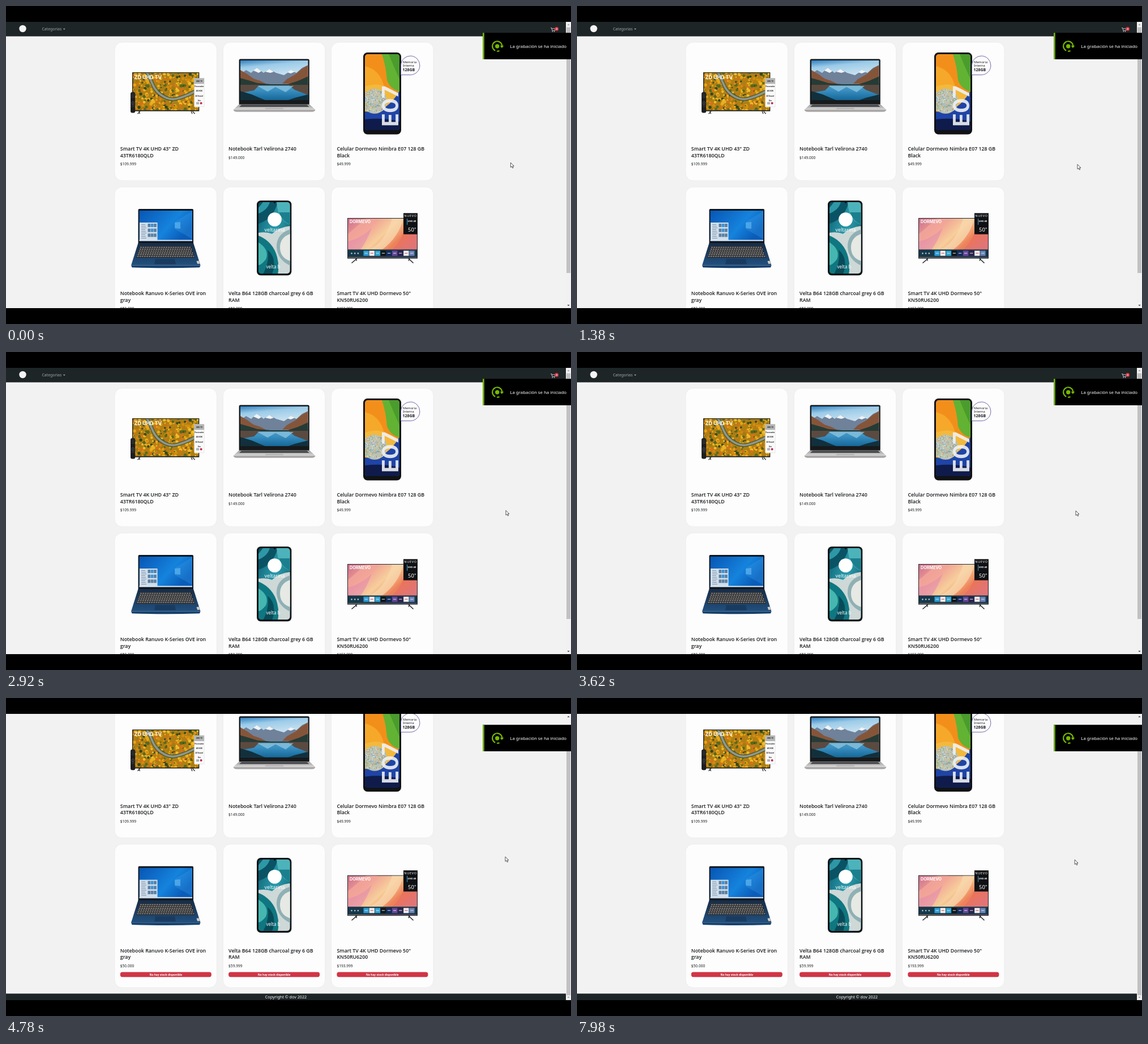
Recreate the animation shown at these times as an HTML page. Size 998 px wide and 561 px high, loop 8000 ms.

```html
<!DOCTYPE html>
<html lang="es">
<head>
<meta charset="utf-8">
<title>Tienda</title>
<style>
  html, body { margin: 0; width: 100%; height: 100%; overflow: hidden; background: #000; }
  svg { display: block; width: 998px; height: 561px; }
  text { font-family: "Noto Sans", "Open Sans", sans-serif; }
  .title { font-family: "Open Sans", "Noto Sans", sans-serif; font-size: 8.8px; font-weight: 600; fill: #17191c; }
  .price { font-size: 6.6px; fill: #1d2023; }
  .stock { font-size: 4.85px; font-weight: 700; fill: #fff; text-anchor: middle; }
  .geo { font-family: "Inter", sans-serif; }
</style>
</head>
<body>
<svg viewBox="0 0 998 561">
  <defs>
    <clipPath id="view"><rect y="28" width="998" height="505"/></clipPath>
    <clipPath id="tvA"><rect x="224.5" y="118.3" width="115.5" height="65.5"/></clipPath>
    <clipPath id="lapA"><rect x="414" y="96" width="119.5" height="70"/></clipPath>
    <clipPath id="telA"><rect x="634" y="85" width="61" height="134" rx="5"/></clipPath>
    <clipPath id="telB"><rect x="446" y="346" width="55.5" height="126" rx="5"/></clipPath>
    <linearGradient id="sky" x2=".3" y2="1">
      <stop offset="0" stop-color="#2f7fc0"/><stop offset=".3" stop-color="#9ccbe8"/><stop offset="1" stop-color="#e2eff5"/>
    </linearGradient>
    <linearGradient id="lake" x2="0" y2="1">
      <stop offset="0" stop-color="#6f8794"/><stop offset=".4" stop-color="#3c93c4"/><stop offset="1" stop-color="#136596"/>
    </linearGradient>
    <linearGradient id="silver" x2="0" y2="1">
      <stop offset="0" stop-color="#9c9c9e"/><stop offset="1" stop-color="#dad8d7"/>
    </linearGradient>
    <linearGradient id="desk" x2="1" y2=".5">
      <stop offset="0" stop-color="#0856b4"/><stop offset=".65" stop-color="#1583dd"/><stop offset="1" stop-color="#0a5cb8"/>
    </linearGradient>
    <linearGradient id="navy" x2="0" y2="1">
      <stop offset="0" stop-color="#182c45"/><stop offset="1" stop-color="#21507f"/>
    </linearGradient>
    <linearGradient id="teal" x2="1" y2=".8">
      <stop offset="0" stop-color="#0c5f72"/><stop offset=".5" stop-color="#2b9bab"/><stop offset="1" stop-color="#0b5564"/>
    </linearGradient>
    <linearGradient id="sunset" x2="1" y2=".6">
      <stop offset="0" stop-color="#cd6f8c"/><stop offset=".3" stop-color="#f0a294"/><stop offset=".55" stop-color="#f7cf9c"/>
      <stop offset=".78" stop-color="#ee8158"/><stop offset="1" stop-color="#cf83a8"/>
    </linearGradient>
  </defs>

  <g clip-path="url(#view)">
    <rect y="28" width="998" height="505" fill="#f2f2f2"/>
    <g id="page">
      <rect y="28" width="989" height="25.5" fill="#1e2527"/>
      <circle cx="29.5" cy="40" r="6.2" fill="#f4f4f4"/>
      <text x="63.5" y="43.3" font-size="6.9" fill="#a3a6a8">Categorias</text>
      <path d="M100.8 39.8h4l-2 2.1z" fill="#a3a6a8"/>
      <path d="M962 38.6h1.6l1.3 4.8h4.4l1-3.5h-6.2" fill="none" stroke="#e8e8e8" stroke-width=".8"/>
      <circle cx="965.3" cy="45" r=".8" fill="#e8e8e8"/><circle cx="968.6" cy="45" r=".8" fill="#e8e8e8"/>
      <circle cx="972.6" cy="40.4" r="3.4" fill="#dc3545"/>
      <text x="972.6" y="42" font-size="4.2" font-weight="700" fill="#fff" text-anchor="middle">0</text>

      <g id="cards"></g>

      <!-- television with autumn forest -->
      <g>
        <rect x="223" y="117" width="118.3" height="68.6" fill="#1b1d19"/>
        <g clip-path="url(#tvA)">
          <rect x="223" y="117" width="119" height="69" fill="#b07f14"/>
          <g id="leaves"></g>
          <path d="M248 116C258 130 258 146 274 157S300 165 316 159S330 150 344 150" fill="none" stroke="#4c5a2c" stroke-width="6.5"/>
          <path d="M248 116C258 130 258 146 274 157S300 165 316 159S330 150 344 150" fill="none" stroke="#8f968c" stroke-width="3.8"/>
        </g>
        <text class="geo" x="226.5" y="128.6" font-size="8.9" font-weight="700" fill="#fff">ZD UHD TV</text>
        <path d="M237 185.6l-4.5 4.6M234.5 185.6l2 4.6M327 185.6l2 4.6M329.5 185.6l4 4.6" stroke="#26282a" stroke-width="1.3"/>
        <rect x="220" y="152" width="8.2" height="36.5" rx="3" fill="#1d1e20"/>
        <g id="buttons"></g>
        <circle cx="224.1" cy="171" r="2.2" fill="none" stroke="#6a6c70" stroke-width=".7"/>
        <rect x="332.6" y="127.4" width="17.4" height="50.5" fill="#fafafa" stroke="#d4d4d4" stroke-width=".5"/>
        <rect x="332.6" y="127.4" width="17.4" height="10" fill="#b4b5b5"/>
        <g font-size="3" font-weight="700" fill="#222" text-anchor="middle">
          <text x="341.3" y="133.8">UHD TV</text><text x="341.3" y="143">Procesador</text>
          <text x="341.3" y="151.4">4K HDR</text><text x="341.3" y="159.6">AI Sound</text><text x="341.3" y="167.5">Voz</text>
        </g>
        <circle cx="344.6" cy="171.4" r="2" fill="#c32a51"/><rect x="336" y="169.5" width="5" height="4" fill="#aab2bd"/>
      </g>

      <!-- silver notebook -->
      <g>
        <rect x="411.6" y="93.6" width="124.2" height="81" rx="2.5" fill="#17191b"/>
        <g clip-path="url(#lapA)">
          <rect x="414" y="96" width="120" height="40" fill="url(#sky)"/>
          <rect x="414" y="134" width="120" height="33" fill="url(#lake)"/>
          <path d="M414 120l10-7 9 5 10-9 12 9 10-7 12 7 14 4 12-8 10 4 10-9 11-5v33H414z" fill="#70819a"/>
          <path d="M437 114l6-5 8 6-5 3-4-2zM458 116l7-5 8 5-6 2zM497 117l6-4 7 3-7 3z" fill="#eef3f6"/>
          <path d="M414 113l12 7 11 8 12 4 10 5h-45zM534 104l-13 8-9 8-16 9-8 8h46z" fill="#85553a"/>
          <path d="M414 127l14 4 16 5 24 2h30l18-6 18-8v16H414z" fill="#263b36"/>
          <path d="M414 139h34l-10 10-24 4zM534 139h-36l12 9 24 9z" fill="#5b4a40"/>
          <path d="M444 141l18 10 14-8 18 9 14-11z" fill="#8cc6e2" opacity=".75"/>
          <path d="M414 150l20 6 14 6 12 5h-46zM534 156l-24 6-14 5h38z" fill="#12303c"/>
        </g>
        <path d="M411.6 173.500h124.400l10.500 9.500H401.500z" fill="url(#silver)"/>
        <path d="M416 174.300h115.500l4 3.600H412z" fill="#47494c"/>
        <path d="M459 179.500h30l1.400 2.600h-33z" fill="#b5b4b4"/>
        <path d="M401.500 183h145q-1 3.700-6 3.700H407.500q-5 0-6-3.700z" fill="#a9a7a6"/>
      </g>

      <!-- phone with side lettering -->
      <g>
        <rect x="631" y="82" width="67" height="144.500" rx="7.500" fill="#111214"/>
        <g clip-path="url(#telA)">
          <rect x="634" y="85" width="61" height="134" fill="#1e43a0"/>
          <path d="M634 85h61v70l-61 20z" fill="#f28f1b"/>
          <path d="M634 106q26 6 34 36l-34 24z" fill="#f6a82b"/>
          <path d="M664 85h31v66q-16-4-22-20-2-26-9-46z" fill="#62b234"/>
          <path d="M676 85h19v44q-10-22-19-44z" fill="#4a9c2c"/>
          <path d="M634 142q30-12 61 16v22l-61 14z" fill="#f2b93e"/>
          <path d="M634 186q36 6 61-36v70h-61z" fill="#1f44a6"/>
          <path d="M634 200q34-4 61 4v16h-61z" fill="#0f1b4a"/>
          <circle cx="651" cy="168" r="22" fill="#b9c1b6"/>
          <g id="dots"></g>
        </g>
        <text class="geo" transform="translate(692.500 213) rotate(-90)" font-size="39.500" font-weight="700" fill="#eef1f5" opacity=".9">E07</text>
        <path d="M697.500 121.500V104.500a16.700 16.700 0 1 1 16.700 17z" fill="#fdfdfd" stroke="#5b58a0" stroke-width=".9"/>
        <g class="geo" fill="#1d1d25">
          <text x="701" y="101" font-size="5.700">Memoria</text>
          <text x="701" y="107" font-size="5.700">Interna</text>
          <text x="700.500" y="115.300" font-size="7" font-weight="700">128GB</text>
        </g>
      </g>

      <!-- blue notebook -->
      <g>
        <rect x="233.500" y="358" width="97.500" height="62" rx="2" fill="#12161c"/>
        <rect x="235.500" y="361" width="93.500" height="53.500" fill="url(#desk)"/>
        <path d="M329 362l-30 18v14l30 17z" fill="#42a9ee" opacity=".25"/>
        <path d="M298 382l10-1v12l-10-1z" fill="#7cc8f5" opacity=".5"/>
        <rect x="236" y="382" width="31.500" height="31" fill="#cfdeec"/>
        <g id="tiles"></g>
        <rect x="235.500" y="412.600" width="93.500" height="2" fill="#dfe6ee"/>
        <path d="M233.500 418h97.500l12.500 39.500H221z" fill="url(#navy)"/>
        <path d="M237 424h90l7 20H230z" fill="#22262c"/>
        <g id="keys" stroke="#85807a" stroke-width="2" fill="none" stroke-dasharray="3 1.100"></g>
        <path d="M264 446h34l2 9.500h-38z" fill="#1a3b60"/>
        <path d="M221 457.500h122.500l-1.500 3.800q-60 2-119.500 0z" fill="#16406c"/>
        <path d="M336.500 450l4-.5 1.700 5-4 .6z" fill="#d9cfc4"/>
      </g>

      <!-- teal phone -->
      <g>
        <rect x="443" y="343.300" width="61.300" height="132" rx="7" fill="#0f1214"/>
        <g clip-path="url(#telB)">
          <rect x="446" y="346" width="56" height="127" fill="url(#teal)"/>
          <path d="M480 346q-8 30-34 38v-38z" fill="#0a5365"/>
          <path d="M466 346q-4 14-20 20v-10l8-10z" fill="#2e97a6"/>
          <path d="M502 346v40q-22-8-24-40z" fill="#4db3bb"/>
          <path d="M502 364v22q-14-6-20-22z" fill="#1c7f8e"/>
          <path d="M446 400q14-2 24 2 12-12 32-14v85h-22q2-44-34-62z" fill="#cdd8d7"/>
          <path d="M502 394q-25 8-24 32 2 22 24 32z" fill="#8fb0b4"/>
          <path d="M502 402q-18 6-18 24t18 24z" fill="#e6e9e4"/>
          <path d="M446 405q26 11 33 38 4 16 1 30h-34z" fill="#0f7781"/>
          <path d="M446 417q20 13 13 30-8 10-13 10z" fill="#46b7b0"/>
          <path d="M462 430q18 15 8 43H454q12-22 8-43z" fill="#084b58"/>
        </g>
        <circle cx="474.500" cy="346.700" r="1.300" fill="#050607"/>
        <circle cx="474.500" cy="376.500" r="12.300" fill="#fff"/>
        <g class="geo" fill="#fff" text-anchor="middle">
          <text x="474.500" y="398.300" font-size="8.800">veltarina</text>
          <text x="472" y="463.300" font-size="8">velta b</text>
        </g>
      </g>

      <!-- television with app row -->
      <g>
        <rect x="603" y="374" width="124" height="71.500" fill="#23262d"/>
        <rect x="604" y="375" width="122" height="69" fill="url(#sunset)"/>
        <path d="M604 402l32-27h20q-22 32-52 47z" fill="#f4a59a" opacity=".8"/>
        <path d="M640 430q28-10 42-55h20q-9 34-38 55z" fill="#f9d9ae" opacity=".75"/>
        <path d="M681 430q20-16 25-46l20 18v28z" fill="#ea6d5c" opacity=".65"/>
        <path d="M604 430v-15q24-5 42-24-9 25-20 39z" fill="#e48cae" opacity=".6"/>
        <rect x="604" y="429.500" width="122" height="14" fill="#16384a"/>
        <g id="apps"></g>
        <text class="geo" x="607" y="383.400" font-size="7.200" font-weight="700" fill="#fff">DORMEVO</text>
        <rect x="702" y="365.400" width="25" height="37.300" fill="#101114"/>
        <path d="M708.700 375v11" stroke="#3aa5dd" stroke-width="1"/>
        <g class="geo" fill="#fff" text-anchor="middle">
          <text x="714.500" y="372.300" font-size="5.600" letter-spacing=".7">NUEVO</text>
          <text x="717" y="381.300" font-size="4" font-weight="700">UHD 4K</text>
          <text x="717.300" y="398.300" font-size="9.400">50"</text>
        </g>
        <path d="M620 445.500l-9.500 8M617.500 445.500l2 4M711 445.500l8.500 8M713 445.500l-2 4" stroke="#24262a" stroke-width="1.500"/>
      </g>

      <rect y="582.800" width="989" height="12" fill="#1e2527"/>
      <text x="494.500" y="591.200" font-size="7.200" fill="#fff" text-anchor="middle">Copyright © dov 2022</text>
    </g>

    <rect x="989" y="28" width="9" height="505" fill="#f1f1f1"/>
    <path d="M991.300 34h4.400l-2.200-2.500z" id="up"/>
    <path d="M991.300 527h4.400l-2.200 2.500z" id="down"/>
    <rect id="thumb" x="990" y="37.500" width="7" height="433.500" fill="#c1c1c1"/>

    <rect x="842" y="47.300" width="156" height="46.700" fill="#000"/>
    <rect x="842" y="47.300" width="2.800" height="46.700" fill="#70ad12"/>
    <g stroke="#76b900" fill="none" stroke-width="2.200">
      <path d="M864.200 78.700A8.600 8.600 0 1 1 876.300 70.500"/>
      <path d="M867 79.700A8.600 8.600 0 0 0 871.500 79" stroke-width="2"/>
    </g>
    <path d="M872.600 70h6.600l-3.300 4.300z" fill="#76b900"/>
    <circle cx="867.700" cy="71" r="3.700" fill="#76b900"/>
    <text x="890.300" y="73.900" font-size="7.850" fill="#fff">La grabación se ha iniciado</text>
  </g>

  <path id="cursor" d="M0 0v8.300l1.900-1.700 1.400 3 1.500-.7-1.400-2.900h2.500z" fill="#fff" stroke="#222" stroke-width=".75"/>
</svg>
<script>
const $ = id => document.getElementById(id);
const times = (n, fn) => Array.from({ length: n }, (_, i) => fn(i)).join('');
let seed = 11;
const rnd = () => (seed = (seed * 16807) % 2147483647) / 2147483647;
const pick = list => list[Math.floor(rnd() * list.length)];
const box = (x, y, w, h, fill) => `<rect x="${x}" y="${y}" width="${w}" height="${h}" fill="${fill}"/>`;
const dot = (x, y, r, fill) => `<circle cx="${x}" cy="${y}" r="${r}" fill="${fill}"/>`;

const products = [
  ['$109.999', 'Smart TV 4K UHD 43" ZD', '43TR6180QLD'],
  ['$149.000', 'Notebook Tarl Velirona 2740'],
  ['$49.999', 'Celular Dormevo Nimbra E07 128 GB', 'Black'],
  ['$50.000', 'Notebook Ranuvo K-Series OVE iron', 'gray'],
  ['$59.999', 'Velta B64 128GB charcoal grey 6 GB', 'RAM'],
  ['$193.999', 'Smart TV 4K UHD Dormevo 50"', 'KN50RU6200']
];

function card([price, ...lines], i) {
  const x = 192 + (i % 3) * 191.3, low = i > 2;
  const top = low ? 319.3 : 64, base = low ? 510.2 : 255.1;
  const label = (cls, y, s) => `<text class="${cls}" x="${x + 9.8}" y="${y}">${s}</text>`;
  let out = `<rect x="${x}" y="${top}" width="180.4" height="${low ? 253 : 244}" rx="13" fill="#fdfdfd" stroke="#e6e6e6" stroke-width=".6"/>`;
  lines.forEach((s, n) => out += label('title', base + n * 11.5, s));
  out += label('price', base + 3.1 + lines.length * 11.4, price);
  if (low) out += `<rect x="${x + 9.8}" y="544.7" width="161" height="8.8" rx="3.6" fill="#d03546"/>
    <text class="stock" x="${x + 90.3}" y="550.9">No hay stock disponible</text>`;
  return out;
}

$('cards').innerHTML = products.map(card).join('');
const foliage = ['#e6a614', '#d58a10', '#f0bd2a', '#56691f', '#33481a', '#d9701a', '#a37a14', '#eab020'];
$('leaves').innerHTML = times(420, () => dot(223 + rnd() * 119, 117 + rnd() * 69, 1 + rnd() * 2, pick(foliage)));
$('buttons').innerHTML = times(18, i => dot(222 + (i % 3) * 2.1, 155 + Math.floor(i / 3) * 2.2 + (i > 11 ? 11 : 0), .5, '#66686c'));
$('dots').innerHTML = times(260, () => {
  const a = rnd() * 6.283, r = 21.5 * Math.sqrt(rnd());
  return dot(651 + r * Math.cos(a), 168 + r * Math.sin(a), .8, pick(['#e9c56a', '#5b9bc0', '#e8ece6', '#d98a4a', '#7fae78']));
});
$('tiles').innerHTML = times(9, i => box(250.5 + (i % 3) * 5.3, 384 + Math.floor(i / 3) * 8.7, 4.7, 6, pick(['#2779c4', '#3b92d5', '#5d7f9e'])))
  + times(9, i => box(239, 385 + i * 3, 7 + (i % 3), .8, '#6f8193'));
$('keys').innerHTML = times(6, i => `<path d="M${237 - i * 1.1} ${425.8 + i * 3.2}H${327 + i * 1.1}"/>`);
$('apps').innerHTML = times(3, i => dot(610.5 + i * 5.7, 436.4, 1.4, '#a8bbc4'))
  + ['#2d9fd8', '#f4f0f0', '#32a6d2', '#111417', '#15285c', '#69459a', '#30204e', '#f2eff2', '#6c83b7']
    .map((c, i) => box(631.5 + i * 10.1, 431.7, 9.3, 9, c) + box(633.5 + i * 10.1, 435.6, 5.3, 1.1, i % 6 == 1 ? '#c75460' : '#d5dde6')).join('');

// time, x, y of the pointer tip
const path = [
  [0, 891.4, 276.3], [820, 886, 278.3], [1380, 884, 279.4], [2360, 883.5, 279.4], [3060, 882.8, 279.5],
  [3600, 881, 280], [4200, 881.8, 280], [5060, 882, 280], [5340, 882.6, 279.4], [7820, 882.6, 279.4], [7980, 879.2, 285.2]
];

function pointer(t) {
  const n = path.findIndex(p => p[0] > t);
  if (n < 0) return path[path.length - 1].slice(1);
  const [a, b] = [path[n - 1], path[n]], k = (t - a[0]) / (b[0] - a[0]);
  return [1, 2].map(i => a[i] + (b[i] - a[i]) * k);
}

function draw(t) {
  const k = Math.min(1, Math.max(0, (t - 4605) / 165));
  const ease = k * k * (3 - 2 * k);
  $('page').setAttribute('transform', `translate(0 ${-61.3 * ease})`);
  $('thumb').setAttribute('y', 37.5 + 53.5 * ease);
  $('up').setAttribute('fill', ease > 0 ? '#505050' : '#a3a3a3');
  $('down').setAttribute('fill', ease < 1 ? '#505050' : '#a3a3a3');
  $('cursor').setAttribute('transform', `translate(${pointer(t).join(' ')})`);
}

const start = performance.now();
function tick() {
  draw((performance.now() - start) % 8000);
  requestAnimationFrame(tick);
}
draw(0);
requestAnimationFrame(tick);
</script>
</body>
</html>
```
